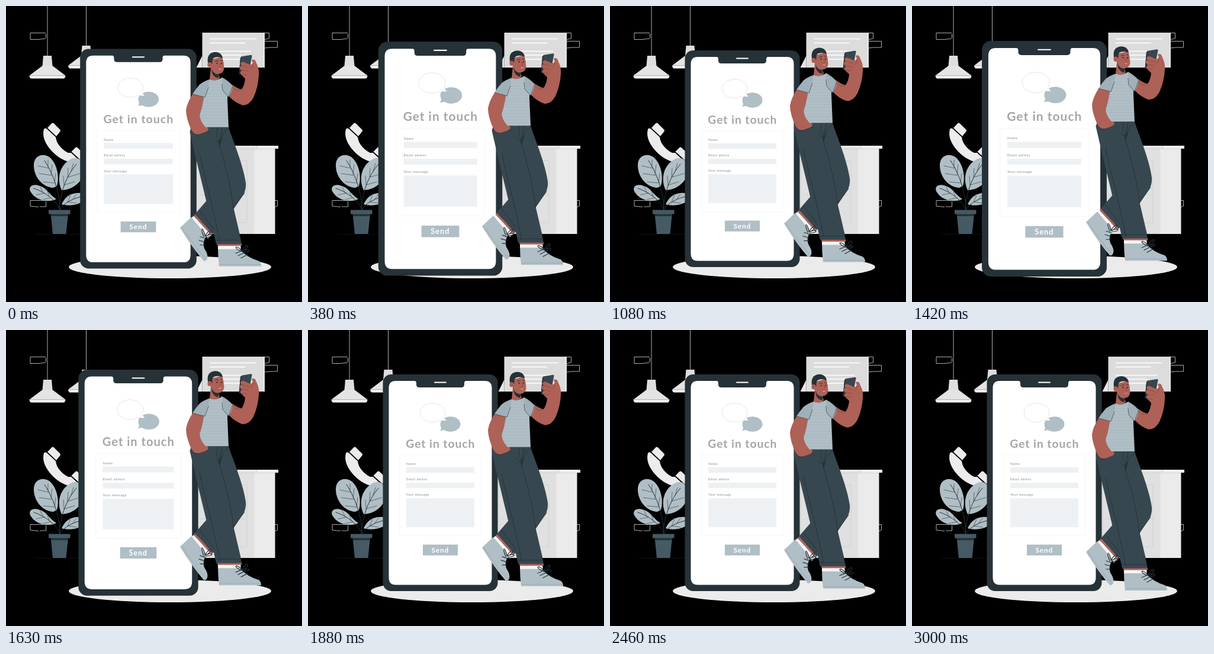
An HTML page that plays this animation: 500 by 500 pixels, repeating every 3.04 s.

```html
<!DOCTYPE html>
<html lang="en">
<head>
<meta charset="utf-8">
<title>Get in touch</title>
<style>
html, body { margin: 0; width: 100%; height: 100%; overflow: hidden; background: #000; }
svg { display: block; width: 100vw; height: 100vh; }
text { font-family: Lato, "Open Sans", sans-serif; }
.line { fill: none; stroke: #263238; stroke-linecap: round; stroke-linejoin: round; }
.label { font-size: 5.5px; letter-spacing: .5px; fill: #858585; }
.skin { fill: #ae6156; }
.dark { fill: #263238; }
.denim { fill: #37474f; }
.cloth { fill: #b0bec5; }
.sleeve { fill: #a1b0b8; }
.crease { fill: none; stroke: #864238; stroke-linecap: round; stroke-width: .7; }
.sole { fill: none; stroke: #93a4ad; stroke-width: .7; }
</style>
</head>
<body>
<svg viewBox="0 0 500 500">
  <defs>
    <pattern id="stripes" width="10" height="5.2" patternUnits="userSpaceOnUse">
      <rect width="10" height="5.2" fill="#b0bec5"/>
      <path d="M0 2.6H10" stroke="#9fafb7" stroke-width=".6"/>
    </pattern>
    <g id="lamp">
      <path d="M70-30V84" stroke="#c4c4c4" stroke-width=".9"/>
      <path d="M63 84H77L78.500 101.500H61.500Z" fill="#dedede"/>
      <path d="M61.500 101H78.500L100.500 117.500H39.500Z" fill="#e4e4e4"/>
      <path d="M39.500 117.500H100.500Q100 122.500 97 122.500H43Q40 122.500 39.500 117.500Z" fill="#f1f1f1"/>
    </g>
  </defs>

  <g id="room">
    <path d="M50 385.400H454" stroke="#1c1c1c" stroke-width=".7"/>
    <g fill="none" stroke="#d8d8d8" stroke-width=".8">
      <path d="M67 45.500H41V56.500H55L67 55M67.500 47V54"/>
      <path d="M67 328.500H41V338L55 339.500M67.500 330V339H57"/>
      <path d="M437 45.500H444.500V55L437 56.500M437 59.500H458.500V70H446L437 71"/>
      <path d="M454 328.500H458.500V338L454 339.500"/>
    </g>
    <use href="#lamp"/>
    <use href="#lamp" x="65.500" y="-17"/>

    <path d="M331.500 45H437V104H331.500Z" fill="#dcdcdc"/>
    <path d="M435 45H437V104H435Z" fill="#e8e8e8"/>
    <path d="M331.500 84V104H321.500Z" fill="#e6e6e6"/>
    <path d="M344 55.500H422.500M344 62.500H404M344 76.500H414M344 83H398M344 90H404" stroke="#fff" stroke-width="1.4"/>

    <path d="M310 241H420V385H310Z" fill="#e0e0e0"/>
    <path d="M419.500 241H454.500V385H419.500Z" fill="#ebebeb"/>
    <path d="M310 236H424V241H310Z" fill="#e6e6e6"/>
    <path d="M424 236H460V241H424Z" fill="#f0f0f0"/>
    <path d="M310 241.300H454.500M424 236V241" stroke="#c2c2c2" stroke-width=".6"/>
    <path d="M322 261.500H407V366H322ZM326 319H407" fill="none" stroke="#cbcbcb" stroke-width=".7"/>

    <g fill="#ececec">
      <path d="M64 208Q66 205 69.500 208L84 221.500Q85 230 91 237Q98 245 105 248L110 248L125 262Q119 266 109 264Q88 259 73 240Q60 223 64 208Z"/>
      <path d="M70 206L77 198.500Q79 196.500 81 198.500L91 208.500Q93 210.500 91 212.500L85 220Z"/>
      <path d="M110.500 246L117 239.500Q119 237.500 121 239.500L133 251L126 260Z"/>
    </g>

    <g id="plant">
      <g class="cloth">
        <path d="M80 307C62 306 48 290 47 271C46 255 58 249 69 253C83 258 92 285 86 304Z"/>
        <path d="M85 326C72 333 50 329 41 313C37 303 48 300 57 304C69 307 74 320 85 326Z"/>
        <path d="M94 311C85 292 90 268 111 258C124 253 135 265 131 283C127 301 108 311 94 311Z"/>
        <path d="M94 335C101 318 116 313 134 317V326C126 336 107 339 94 335Z"/>
      </g>
      <g class="line" stroke-width="1">
        <path d="M91 344C91 319 82 287 65 261M91 344C86 330 68 315 47 308M90 344C92 310 104 285 119 267M91 344C98 332 115 324 132 321"/>
        <path stroke-width=".6" d="M71 272V260M76 284L78 268M82 298L84 283M72 274L54 270M77 286L56 283M82 299L63 297M98 303L97 287M104 289L105 274M110 279L114 266M99 302L116 297M105 289L125 283M62 314L58 306M73 322L70 312M65 316L51 319M76 324L62 327M104 331L109 320M113 326L119 318M105 331L119 333"/>
      </g>
      <path d="M75.500 351H105L101.500 385H79Z" fill="#455a64"/>
      <path d="M75.500 351H105L104.500 355H76Z" class="dark"/>
      <path d="M72 344.500H108.500V351.500H72Z" fill="#455a64"/>
    </g>
    <ellipse cx="277" cy="441" rx="171" ry="19" fill="#ebebeb"/>
  </g>

  <g id="phone">
    <rect x="126.500" y="75" width="194" height="366" rx="14" class="dark"/>
    <path d="M148 86H180Q183 86 183 90V92Q183 97 188 97H259Q264 97 264 92V90Q264 86 267 86H299Q310.500 86 310.500 98V418Q310.500 430.500 299 430.500H148Q136.500 430.500 136.500 418V98Q136.500 86 148 86Z" fill="#fff"/>
    <path d="M214 88.500H233" stroke="#fff" stroke-width="2" stroke-linecap="round"/>
    <path d="M228 148.500A21.200 16 0 1 1 231.500 141Q231 146 229 148Q230 151 233 152.500Q228 152 225 150" fill="#fff" stroke="#dadada" stroke-width=".7"/>
    <ellipse cx="240.500" cy="159" rx="17" ry="12.800" class="cloth"/>
    <path d="M224.500 162Q226 167 222.500 170Q229 170 232 167Z" class="cloth"/>
    <path d="M223.500 151Q227 154 234 152.500Q231 151 230.500 148Z" fill="#fff"/>
    <text x="165.300" y="199" font-size="19.3" font-weight="700" letter-spacing=".95" fill="#a6a6a6">Get in touch</text>
    <rect x="154.500" y="210.500" width="138.500" height="137" fill="none" stroke="#f3f3f3" stroke-width=".7"/>
    <text class="label" x="166" y="228">Name</text>
    <text class="label" x="166" y="254">Email adress</text>
    <text class="label" x="166" y="280.300">Your message</text>
    <path d="M166 231.700H281V241.200H166ZM166 258H281V267.300H166ZM166 284.200H281V333.300H166Z" fill="#eef1f4"/>
    <path d="M194 362.600H253V380.700H194Z" class="cloth"/>
    <text x="208.500" y="375.500" font-size="11.8" font-weight="700" letter-spacing=".9" fill="#fff">Send</text>
  </g>

  <g id="person">
    <!-- rear leg and shoe -->
    <path d="M340 205H376C381 222 401 268 405 299Q406 308 402 317L384 344L349 386L319 352L345 322Z" class="denim"/>
    <path d="M319 352L349 385.500L346.500 388L317 355Z" class="skin"/>
    <path d="M317 355L346.500 387.500L341 393L313 358Z" fill="#f5f5f5"/>
    <path d="M313 357L339 388Q331 399 335 410Q342 420 340 427Q338 432 334 431Q315 409 294 375Q303 366 313 357Z" class="cloth"/>
    <path class="sole" d="M296 373Q317 406 338 428"/>
    <path class="line" stroke-width="1.2" d="M328 390L337 393M326 396L336 399M328 404L336 404M334 390C327 373 333 373 336 388M336 389C346 372 352 381 338 389M337 389C350 383 353 390 338 391"/>

    <!-- front leg and shoe -->
    <path d="M358 409H395L396 412Q407 425 427 431Q431 434 431 440H360Q358 424 358 409Z" class="cloth"/>
    <path class="sole" d="M360 437H431"/>
    <path d="M358 404H396L397 411H358Z" fill="#f5f5f5"/>
    <path d="M356.500 401H398V405.500H357.500Z" class="skin"/>
    <path class="line" stroke-width="1.2" d="M388 418L400 413M392 422L404 416M397 426L408 420M400 414C386 401 383 410 399 415M400 414C404 400 416 403 402 414M402 414C412 409 415 417 402 416"/>
    <path d="M313 205H365L360 230C371 267 381 308 384 342L398 402.500H355C344 350 325 277 310.500 213Z" class="denim"/>
    <path class="line" stroke-width=".9" d="M365 205Q364 222 357 229L352 224M357 205L356 222M376 207Q366 214 363 225M359 231C370 267 381 308 384 342L397 397M355 396H396M327 250C339 305 351 345 361 398M403 316L384 342M327 346L351 377"/>
    <path d="M359 228L366 221Q362 232 361 239Z" class="dark"/>

    <!-- raised arm -->
    <path d="M398 85.500L413.500 83Q416 83 415.500 85L411 108L393.500 116L396 88Z" fill="#37474f"/>
    <path d="M396 88L398 85.500L395.500 114L393.500 116Z" class="dark"/>
    <circle cx="406" cy="88" r=".9" class="dark"/>
    <path d="M382 133Q391 140 398 141Q403 134 404 123L396 115Q395 111 399 110L395 106Q394 102 398 101L396 98Q397 94 402 95L411 99Q416 100 417 96L415 92Q417 89 421 92L424 99Q428 107 427 118Q426 137 418 155Q411 168 400 168Q387 164 376 152Z" class="skin"/>
    <path class="crease" d="M398 101Q404 102 410 105M399 109Q405 108 409 111M399 116Q403 115 407 117M417 97Q417 104 413 107M398 141Q393 145 385 140"/>

    <!-- arm in pocket -->
    <path d="M316 148Q306 163 304 176Q304 190 314 212Q319 219 328 217Q341 214 342 208L328 181L337 154Z" class="skin"/>
    <path class="line" stroke-width=".8" d="M313 210Q317 219 326 217.500L342 212"/>

    <!-- torso -->
    <path d="M344 124Q355 128 365 121L374 128L374 158L376 205H337Q325 191 328 181Q333 167 335 148Z" fill="url(#stripes)"/>
    <path d="M344 124Q333 128 327 133Q320 141 315 149L336 154.500Q341 146 344 124Z" class="sleeve"/>
    <path d="M365 121Q375 126 383 135Q382 146 376 154Q369 149 366 143Z" class="sleeve"/>
    <path class="line" stroke-width=".6" d="M315 149L336 154.500L342 138M376 154L366 143L365 132M383 135L376 154"/>

    <!-- head -->
    <path d="M346 105L344 124Q354 129 361 122L358 112Z" class="skin"/>
    <path d="M347 111Q352 118 359 116L359 122Q351 122 347 111Z" class="dark"/>
    <path d="M345 91L365 86Q368.500 96 368.500 106Q367 114.500 359 115Q350 114 346 107Z" class="skin"/>
    <path d="M341 97Q339 84 346 80Q354 76 361 80Q365.500 83 366 88.500Q358 85 351 88Q348 90 348.500 97L346 100Z" class="dark"/>
    <ellipse cx="344" cy="99.500" rx="3.600" ry="4.200" class="skin"/>
    <path d="M346.500 105Q349 113 355 115Q360 114.500 359 119.500Q349 121 346.500 105Z" class="dark"/>
    <ellipse cx="356.500" cy="97" rx="1" ry="1.500" class="dark"/>
    <ellipse cx="364" cy="97" rx="1" ry="1.500" class="dark"/>
    <path class="line" stroke-width="1" d="M353.500 94Q356 91.500 358.500 93M362.500 92.500L365.500 92"/>
    <path class="crease" d="M361 97L363 102L360.500 102.500M343 98Q345 98 345 101"/>
    <path d="M358.500 106.500Q361.500 107.500 364 106Q362 108.800 358.500 106.500Z" fill="#fff"/>
  </g>
</svg>
<script>
const LOOP = 3040, CYCLE = 3000, LEAD = 40;
const phone = document.getElementById('phone');
const person = document.getElementById('person');

// [cycle fraction, value] pairs, joined linearly
const beat = [[0, 1], [.1, 1.1], [.3, 1], [.4, 1], [.5, 1.1], [.6, 1], [1, 1]];
const float = [[0, 0], [.5, -10], [1, 0]];

function sample(keys, p) {
  const i = Math.max(1, keys.findIndex(([at]) => at >= p));
  const [a, from] = keys[i - 1], [b, to] = keys[i];
  return from + (to - from) * (p - a) / (b - a);
}

function draw(ms) {
  const p = Math.min(ms % LOOP + LEAD, CYCLE) / CYCLE;
  phone.setAttribute('transform',
    `translate(223.5 258.3) scale(${sample(beat, p)}) translate(-223.5 -258.3)`);
  person.setAttribute('transform', `translate(0 ${sample(float, p)})`);
}

const start = performance.now();
function tick() {
  draw(performance.now() - start);
  requestAnimationFrame(tick);
}
tick();
</script>
</body>
</html>
```
